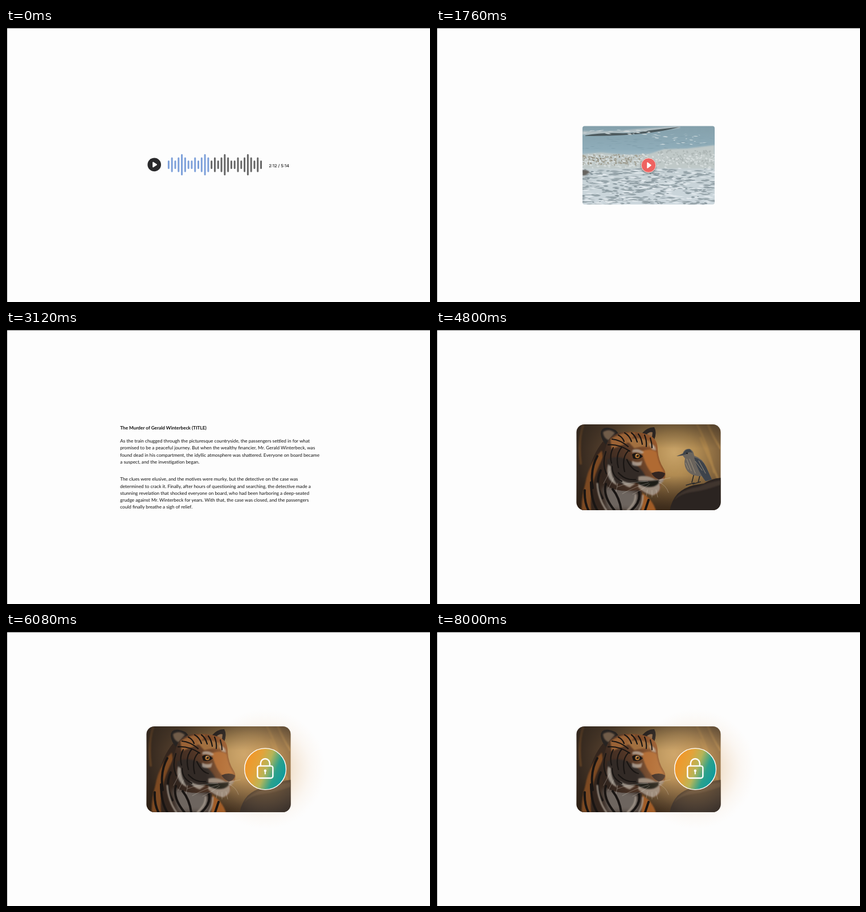
Recreate the animation shown at these times as an HTML page. Size 744 by 482 pixels, loop 8.08 s.

```html
<!DOCTYPE html>
<html lang="en">
<head>
<meta charset="utf-8">
<title>Media showcase</title>
<style>
html, body { margin: 0; width: 100%; height: 100%; overflow: hidden; background: #fdfdfd; }
svg { display: block; width: 100vw; height: 100vh; }
.story { font: 8.22px Lato, Carlito, sans-serif; fill: #111; text-rendering: geometricPrecision; }
.clock { font: 500 7.4px Inter, sans-serif; fill: #161616; text-rendering: geometricPrecision; }
.line { fill: none; stroke-linecap: round; stroke-linejoin: round; }
</style>
</head>
<body>
<svg viewBox="0 0 744 482" preserveAspectRatio="none">
<defs>
  <clipPath id="seaClip"><rect x="257" y="172.5" width="232" height="138" rx="4"/></clipPath>
  <clipPath id="cardClip"><rect x="246.5" y="166" width="253" height="151" rx="14"/></clipPath>
  <filter id="soft" x="-40%" y="-40%" width="180%" height="180%"><feGaussianBlur stdDeviation="1.1"/></filter>
  <filter id="blur" x="-60%" y="-60%" width="220%" height="220%"><feGaussianBlur stdDeviation="4"/></filter>
  <linearGradient id="water" x1="0" y1="0" x2="0" y2="1">
    <stop offset="0" stop-color="#84a0ab"/><stop offset=".3" stop-color="#8fadba"/>
    <stop offset=".52" stop-color="#c5d0d4"/><stop offset="1" stop-color="#ccd7dd"/>
  </linearGradient>
  <radialGradient id="dusk" gradientUnits="userSpaceOnUse" cx="418" cy="216" r="170">
    <stop offset="0" stop-color="#c9a469"/><stop offset=".22" stop-color="#b38d53"/>
    <stop offset=".45" stop-color="#86673f"/><stop offset=".7" stop-color="#55402d"/><stop offset="1" stop-color="#33271e"/>
  </radialGradient>
  <linearGradient id="shade" x1="0" y1="0" x2="0" y2="1">
    <stop offset="0" stop-color="#33291f" stop-opacity=".5"/><stop offset=".28" stop-color="#33291f" stop-opacity="0"/>
    <stop offset=".6" stop-color="#2a1c10" stop-opacity="0"/><stop offset="1" stop-color="#2a1c10" stop-opacity=".75"/>
  </linearGradient>
  <linearGradient id="fur" gradientUnits="userSpaceOnUse" x1="285" y1="260" x2="392" y2="212">
    <stop offset="0" stop-color="#2b211c"/><stop offset=".5" stop-color="#4f3526"/><stop offset="1" stop-color="#96592d"/>
  </linearGradient>
  <linearGradient id="badge" x1="0" y1=".3" x2="1" y2=".7">
    <stop offset=".08" stop-color="#f0982b"/><stop offset=".3" stop-color="#e3a33a"/>
    <stop offset=".52" stop-color="#b5b559"/><stop offset=".74" stop-color="#2ca18c"/><stop offset="1" stop-color="#0a99a0"/>
  </linearGradient>
  <radialGradient id="glow">
    <stop offset=".3" stop-color="#d9a566" stop-opacity=".4"/><stop offset=".5" stop-color="#deaf75" stop-opacity=".26"/>
    <stop offset=".75" stop-color="#e8bf92" stop-opacity=".1"/><stop offset="1" stop-color="#f0d0b0" stop-opacity="0"/>
  </radialGradient>
</defs>
<rect width="744" height="482" fill="#fdfdfd"/>

<g id="audio">
  <circle cx="260.2" cy="240.4" r="11.8" fill="#29292b"/>
  <path d="M258.2 236.6V244.2L264 240.4Z" fill="#fff" stroke="#fff" stroke-width="2" stroke-linejoin="round"/>
  <path id="played" class="line" stroke="#7da0da" stroke-width="3"/>
  <path id="ahead" class="line" stroke="#666" stroke-width="3"/>
  <text class="clock" x="479" y="244.7" text-anchor="middle">2:12 / 5:14</text>
</g>

<g id="video">
  <g clip-path="url(#seaClip)">
    <rect x="257" y="172" width="232" height="139" fill="url(#water)"/>
    <path d="M257 181Q310 183 350 178L428 172V176Q385 182 340 184T257 188Z" fill="#b3c0c4" filter="url(#soft)"/>
    <path d="M262 189Q290 184 320 185T375 180L428 174Q400 182 360 186T262 190Z" fill="#4d5a5e"/>
    <g id="ripples"></g>
    <path d="M257 222L290 219 330 223 373 222 400 213 440 212 489 206V247H257Z" fill="#c0c9c8" filter="url(#soft)"/>
    <g id="surf"></g>
    <path d="M257 250Q264 248 270 254L262 259 257 260Z" fill="#66645f" filter="url(#soft)"/>
  </g>
  <circle cx="373" cy="243" r="13.6" fill="#38484c" opacity=".5" filter="url(#soft)"/>
  <circle cx="373" cy="241.5" r="12.7" fill="#ee6361" stroke="#f5e1dc" stroke-width="1"/>
  <path d="M371 237V246L377 241.5Z" fill="#fff" stroke="#fff" stroke-width="1.6" stroke-linejoin="round"/>
</g>

<g id="story" class="story"></g>

<g id="card">
  <g clip-path="url(#cardClip)">
    <rect x="246" y="166" width="254" height="151" fill="url(#dusk)"/>
    <g class="line" stroke="#c09350" stroke-width="4" opacity=".5" filter="url(#soft)">
      <path d="M458 166Q476 200 488 250M477 166Q487 190 499 208M464 190L495 262"/>
      <path d="M258 168Q249 195 254 235" stroke="#84542c"/>
    </g>
    <rect x="246" y="166" width="254" height="151" fill="url(#shade)"/>

    <!-- tiger -->
    <path d="M293 196Q272 222 266 260Q254 290 254 320H384Q380 305 366 299L340 230Z" fill="#33251d"/>
    <path d="M291 212Q268 235 262 270Q255 295 256 317H272Q268 270 293 225Z" fill="#7c4822" filter="url(#soft)"/>
    <path d="M362 287Q380 298 386 318H360Z" fill="#a05c27" filter="url(#soft)"/>
    <path d="M292 278Q315 272 352 284Q362 300 354 317H302Z" fill="#6d655f" filter="url(#blur)"/>
    <path d="M289 182Q290 170 303 172Q316 174 320 182L300 203Q290 195 289 182Z" fill="#272321"/>
    <path d="M293 180Q303 172 314 181L303 194Q294 190 293 180Z" fill="#6f5b4a" filter="url(#soft)"/>
    <path d="M361 182Q372 170 383 171Q388 180 383 193Z" fill="#2a2421"/>
    <path d="M370 183Q376 178 380 180L379 189Z" fill="#8f6a48"/>
    <path d="M300 199Q308 180 335 179T378 187Q389 194 389 211Q390 229 399 243Q405 252 401 262L394 269Q397 285 383 291Q366 289 355 281Q325 287 302 276Q283 255 292 225Z" fill="url(#fur)"/>
    <path d="M306 192Q325 178 350 181L340 197 308 210Z" fill="#9a6234" filter="url(#soft)"/>
    <path d="M361 213Q377 207 387 215Q390 235 400 249L380 253Q367 240 361 213Z" fill="#b06a33" filter="url(#soft)"/>
    <path d="M335 194Q354 186 377 196L383 208Q368 202 348 208Z" fill="#a26f40" filter="url(#soft)"/>
    <path d="M300 228Q320 218 342 231T369 262Q330 280 303 264Z" fill="#332b27" filter="url(#soft)"/>
    <path d="M355 258Q370 254 385 263L401 261Q398 269 392 271Q397 284 381 291Q366 288 355 277Z" fill="#9a8b7d" filter="url(#soft)"/>
    <path d="M345 211Q355 207 365 215L361 218Q352 213 344 216ZM374 199Q386 202 386 212L379 210ZM302 236Q296 258 312 270L319 274Q307 258 307 240ZM344 230Q355 235 362 230L360 238Q350 241 344 237ZM322 262Q334 270 350 270L340 277Q328 274 322 262Z" fill="#cfc5b8" opacity=".65" filter="url(#soft)"/>
    <path d="M378 252Q391 246 402 252Q401 261 391 263Q383 260 378 252Z" fill="#332521"/>
    <path d="M347 265Q370 267 391 264Q393 271 383 275Q364 280 347 265Z" fill="#1f1a18" filter="url(#soft)"/>
    <path d="M344 219Q352 213 363 222Q357 229 346 226Z" fill="#191513"/>
    <circle cx="353.3" cy="221.5" r="4" fill="#ac7130"/><circle cx="353.8" cy="221.2" r="1.9" fill="#15110e"/>
    <circle cx="352.6" cy="219.8" r=".8" fill="#fff"/>
    <g class="line" stroke="#191513" stroke-width="2.2">
      <path d="M320 185Q327 188 330 196M331 181Q339 185 343 196M343 181Q350 186 353 197M355 183Q360 189 362 201M366 185Q370 194 369 205M376 190Q379 199 379 207"/>
      <path d="M309 192Q323 193 337 205M302 202Q320 200 340 213M311 207Q304 220 308 234M326 206Q314 220 320 242M338 212Q325 224 331 249M335 228Q343 246 355 249M298 214Q291 235 299 253M309 240Q309 258 326 266M320 251Q332 265 350 263"/>
      <path d="M283 222Q270 245 275 278M289 247Q278 270 292 296M272 268Q272 300 283 317M261 282Q260 304 268 318M298 271Q292 291 313 317M310 280Q322 295 325 317M356 285Q360 302 343 317M373 299L367 317" stroke-width="4"/>
    </g>
    <path d="M283 270Q285 298 299 317M350 290Q351 304 336 317M363 291Q363 305 356 317" class="line" stroke="#a89c90" stroke-width="2.5" filter="url(#soft)"/>
    <g class="line" stroke="#e6ded2" stroke-width=".5" opacity=".65">
      <path d="M372 266Q340 267 318 276M373 269Q350 275 327 288M375 271Q360 282 345 289M390 267Q404 273 408 286M392 264L411 260M386 281L389 294M379 282L379 294M371 281L369 292"/>
      <path d="M305 249L294 270M312 260L302 279M319 269L316 284"/>
    </g>

    <path d="M410 318Q413 300 424 288Q436 277 452 273L470 270Q484 261 501 260V318Z" fill="#2b2421"/>
    <path d="M417 300Q430 280 460 276Q480 267 500 264V272Q470 283 450 285T417 300Z" fill="#3f342d" filter="url(#soft)"/>
    <g id="bird">
      <path d="M453 252L449 268M463 256L460 268M439 273L453 269M451 271L464 267" class="line" stroke="#292a2c" stroke-width="1.6"/>
      <path d="M433 217Q436 208 445 209Q452 212 453 221Q468 226 474 241L484 263 473 266 466 257Q450 258 441 248Q434 238 437 226L433 221 422 222Z" fill="#6a645d"/>
      <path d="M453 224Q467 227 474 241L484 263 473 266Q458 246 453 224Z" fill="#3d434b"/>
      <path d="M433 218Q438 208 446 210L450 216Q443 213 438 219L422 222Z" fill="#3d4349"/>
      <path d="M440 227L448 248M445 227L455 252M455 231L467 247M461 230L473 252M438 234L443 245" class="line" stroke="#a3967f" stroke-width=".9"/>
      <circle cx="440.5" cy="217" r="1.2" fill="#100f0e"/>
    </g>
  </g>
</g>

<g id="lock">
  <circle cx="455" cy="241" r="106" fill="url(#glow)"/>
  <circle cx="455" cy="241" r="36.4" fill="url(#badge)" stroke="#fff" stroke-width="1.4"/>
  <g class="line" stroke="#fff" stroke-width="2.4">
    <rect x="441.3" y="235.6" width="27" height="21.4" rx="3.5"/>
    <path d="M446.8 235V231A8 8 0 0 1 462.8 231V235"/>
    <path d="M454.8 245V249.5" stroke-width="2"/>
  </g>
  <circle cx="454.8" cy="244" r="2.2" fill="#fff"/>
</g>

<path d="M0 .5H744" stroke="#858585"/>
<rect width="2" height="482"/>
</svg>
<script>
const $ = id => document.getElementById(id);

// Waveform: a pattern of 13 bars, repeated
const heights = [6, 11.5, 17.2], pattern = "0101210010121";
let bars = ["", ""];
for (let i = 0; i < 29; i++) {
  const h = heights[pattern[i % 13]];
  bars[+(i > 12)] += `M${285.4 + 5.79 * i} ${240.5 - h}v${2 * h}`;
}
$("played").setAttribute("d", bars[0]);
$("ahead").setAttribute("d", bars[1]);

// Seeded dabs of water and foam
let seed = 7;
const rand = (a, b) => a + (b - a) * ((seed = seed * 16807 % 2147483647) / 2147483647);
function dabs(id, count, [x0, x1], [y0, y1], width, height, fill) {
  let d = "";
  while (count--) {
    const w = rand(width / 3, width), h = rand(height / 3, height), tilt = rand(-1, 1);
    d += `M${rand(x0, x1) - w / 2} ${rand(y0, y1)}q${w * .4} ${-h} ${w} ${tilt}q${-w * .5} ${h} ${-w} ${-tilt}z`;
  }
  $(id).insertAdjacentHTML("beforeend", `<path d="${d}" fill="${fill}"/>`);
}
const wide = [257, 489];
dabs("ripples", 60, wide, [190, 214], 18, 1.4, "#819fac");
dabs("ripples", 30, [375, 475], [187, 206], 10, 1.4, "#d0dcdf");
dabs("ripples", 30, [257, 400], [179, 187], 12, 1.5, "#d0d8da");
dabs("surf", 150, [257, 370], [223, 241], 5, 4, "#a4a397");
dabs("surf", 50, [257, 340], [225, 238], 4, 3, "#8a8576");
dabs("surf", 110, [390, 489], [215, 240], 5, 4, "#aeb7b6");
dabs("surf", 190, wide, [222, 246], 6, 4, "#d5dcdc");
dabs("surf", 250, wide, [248, 310], 20, 3.6, "#96a4aa");
dabs("surf", 110, wide, [252, 310], 12, 2.6, "#84939a");
dabs("surf", 160, wide, [246, 311], 18, 2.6, "#e2e9ed");

function lines(y, texts, weight = 400) {
  texts.forEach((text, i) => $("story").insertAdjacentHTML("beforeend",
    `<text x="200.2" y="${y + 12.2 * i}" font-weight="${weight}">${text}</text>`));
}
lines(175.3, ["The Murder of Gerald Winterbeck (TITLE)"], 700);
lines(198.2, [
  "As the train chugged through the picturesque countryside, the passengers settled in for what",
  "promised to be a peaceful journey. But when the wealthy financier, Mr. Gerald Winterbeck, was",
  "found dead in his compartment, the idyllic atmosphere was shattered. Everyone on board became",
  "a suspect, and the investigation began."]);
lines(265.3, [
  "The clues were elusive, and the motives were murky, but the detective on the case was",
  "determined to crack it. Finally, after hours of questioning and searching, the detective made a",
  "stunning revelation that shocked everyone on board, who had been harboring a deep-seated",
  "grudge against Mr. Winterbeck for years. With that, the case was closed, and the passengers",
  "could finally breathe a sigh of relief."]);

// Each part is shown from its start to its end, with hard cuts
const LOOP = 8080;
const spans = {
  audio: [0, 1360], video: [1360, 3120], story: [3120, 4160],
  card: [4160, LOOP], bird: [4160, 5680], lock: [5680, LOOP]
};
function draw(now) {
  const t = now % LOOP;
  for (const id in spans) {
    const [start, end] = spans[id];
    $(id).style.display = t >= start && t < end ? "" : "none";
  }
}
function tick() {
  draw(performance.now());
  requestAnimationFrame(tick);
}
tick();
</script>
</body>
</html>
```
